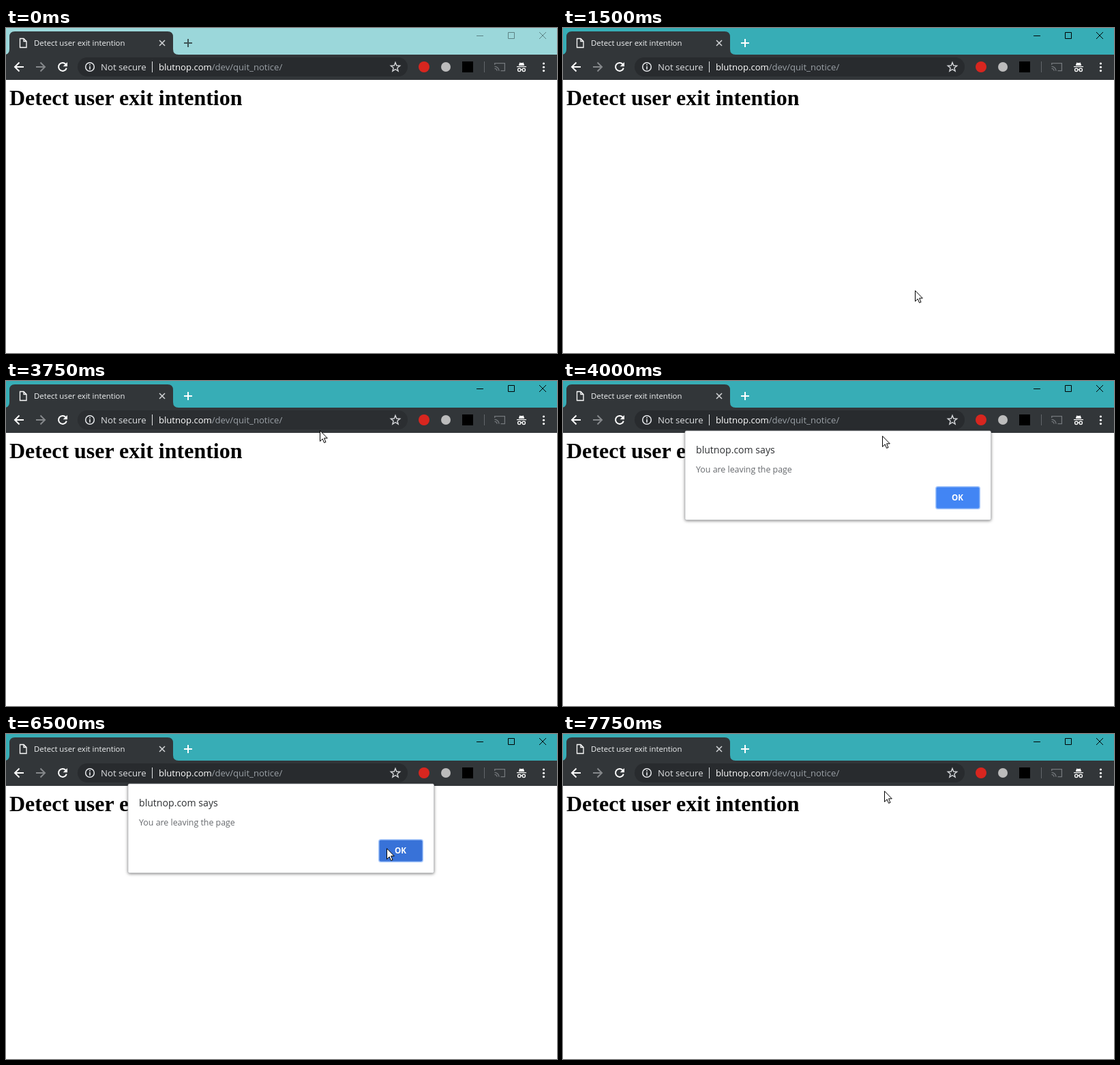
An HTML page that plays this animation: 808x476 px, repeating every 8 s.

```html
<!DOCTYPE html>
<html lang="en">
<head>
<meta charset="utf-8">
<title>Exit intention demo</title>
<style>
  html, body { margin: 0; width: 100%; height: 100%; overflow: hidden; background: #fff; }
  svg { display: block; width: 808px; height: 476px; }
  text { font-family: "Open Sans", "Noto Sans", sans-serif; white-space: pre; }
  .line { fill: none; stroke: #fff; stroke-width: 2; }
  .thin { stroke-width: 1; }
  #heading { font: bold 32px "Liberation Serif", "Times New Roman", serif; }
  #dialog rect.panel { filter: drop-shadow(0 1px 2px rgba(0, 0, 0, .5)); }
</style>
</head>
<body>
<svg viewBox="0 0 808 476">
  <rect width="808" height="476" fill="#fff"/>
  <text id="heading" x="5" y="113">Detect user exit intention</text>

  <!-- Title bar and tab -->
  <rect id="titlebar" width="808" height="39"/>
  <path fill="#323639" d="M-3 39Q5 39 5 31V13Q5 5 13 5H237Q245 5 245 13V31Q245 39 253 39Z"/>
  <path class="line" stroke-width="1" style="stroke-width:1.3" d="M20.5 15.5H26L30 19.5V28.5H20.5ZM26 15.5V19.5H30"/>
  <text x="41" y="26" font-size="11.35" fill="#f1f3f4">Detect user exit intention</text>
  <path class="line" style="stroke:#d0d2d4;stroke-width:1.6" d="M225 18L233 26M233 18L225 26"/>
  <path id="plus" class="line" d="M261 22H273M267 16V28"/>
  <path id="controls" class="line thin" d="M690 11.5H700M736.5 6.5H745.5V15.5H736.5ZM782 6L792 16M792 6L782 16"/>

  <!-- Toolbar -->
  <rect y="39" width="808" height="37" fill="#323639"/>
  <path class="line" d="M26 57H13M19.5 50.5L13 57L19.5 63.5"/>
  <path class="line" style="stroke:#85888b" d="M44 57H57M50.5 50.5L57 57L50.5 63.5"/>
  <path class="line" d="M87.6 53A6 6 0 1 0 88.8 58.6"/>
  <path fill="#fff" d="M90 50V56.3H83.7Z"/>

  <rect id="bar" x="105" y="43" width="484" height="28" rx="14"/>
  <circle class="line" style="stroke:#e8eaed;stroke-width:1.5" cx="123" cy="57" r="6.3"/>
  <path class="line" style="stroke:#e8eaed;stroke-width:1.6" d="M123 53V54.7M123 56V60.7"/>
  <text x="139" y="62" font-size="13.2" fill="#e0e2e4">Not secure</text>
  <path class="line thin" style="stroke:#e0e2e4" d="M214.5 49V65"/>
  <text x="224" y="62" font-size="13.1" fill="#fff">blutnop.com<tspan fill="#9aa0a6">/dev/quit_notice/</tspan></text>
  <path id="star" class="line" style="stroke:#d5d7da;stroke-width:1.4"/>

  <circle cx="613" cy="57" r="8" fill="#d8261f"/>
  <circle cx="645" cy="57" r="7" fill="#bcbcbc"/>
  <rect x="669" y="49" width="16" height="16" fill="#000"/>
  <path class="line thin" style="stroke:#62666a" d="M701.5 49V65"/>
  <path class="line" style="stroke:#73777b;stroke-width:1.3" d="M716.7 54V51.6H731.4V62.6H725.5M716.5 56.3A6.5 6.5 0 0 1 723 62.8M716.5 59.3A3.5 3.5 0 0 1 720 62.8"/>
  <path fill="#fff" d="M751.8 55L753.2 50.5Q756 51.6 758.8 50.5L760.2 55ZM749 56H763V57.2H749Z"/>
  <path class="line" style="stroke-width:1.3" d="M755 61Q756 60.2 757 61"/>
  <circle class="line" style="stroke-width:1.3" cx="752.7" cy="61.3" r="2.2"/>
  <circle class="line" style="stroke-width:1.3" cx="759.3" cy="61.3" r="2.2"/>
  <g fill="#fff">
    <circle cx="788.5" cy="52" r="1.6"/>
    <circle cx="788.5" cy="57.3" r="1.6"/>
    <circle cx="788.5" cy="62.6" r="1.6"/>
  </g>

  <g id="dialog">
    <rect class="panel" x="179" y="73" width="448.5" height="130.5" rx="2" fill="#fff" stroke="#b8babd" stroke-width=".7"/>
    <text x="195" y="106" font-size="14.1" fill="#2b2d30">blutnop.com says</text>
    <text x="195" y="134" font-size="12.4" fill="#66696d">You are leaving the page</text>
    <rect x="546" y="154" width="66" height="34" rx="3.5" fill="#a5c6fa"/>
    <rect id="button" x="547.5" y="155.5" width="63" height="31" rx="2"/>
    <text x="578.5" y="175" font-size="11.6" font-weight="700" text-anchor="middle" fill="#fff">OK</text>
  </g>

  <path id="cursor" fill="#fff" stroke="#000" stroke-width="1"
    d="M.5 .7V16.3L4.2 12.8L6.6 18.4L9 17.4L6.6 11.8H11.3Z"/>
</svg>

<script>
const LOOP = 8000;
const $ = id => document.getElementById(id);

// Each row: start time, value held until the next row.
const cursorSteps = [
  [0, null], [750, [516, 418]], [1500, [516, 384]], [1750, [358, 233]],
  [2000, [246, 205]], [2250, [248, 202]], [2500, [440, 192]], [2750, [469, 139]],
  [3000, [561, 31]], [3250, [565, 15]], [3750, [460, 72]], [4000, [468, 80]],
  [5000, [469, 93]], [5750, [470, 86]], [6000, [533, 147]], [6250, [558, 167]],
  [7000, [491, 215]], [7250, [454, 330]], [7500, [469, 134]], [7750, [471, 83]]
];
const barSteps = [[0, '#282b2e'], [3000, '#2b2e31'], [3250, '#282b2e'], [3750, '#2b2e31'], [4000, '#282b2e']];
const buttonSteps = [[0, '#4285f4'], [6250, '#3f80ee'], [6500, '#3872d8']];
const dialogSteps = [[0, false], [4000, true], [6750, false]];
const focusSteps = [[0, false], [500, true]];

const at = (steps, t) => steps.findLast(([start]) => t >= start)[1];
const show = (el, on) => el.setAttribute('visibility', on ? 'visible' : 'hidden');

const starPoints = Array.from({ length: 10 }, (_, i) => {
  const r = i % 2 ? 3 : 7, a = (i / 5 - .5) * Math.PI;
  return [571 + r * Math.cos(a), 57.5 + r * Math.sin(a)];
});
$('star').setAttribute('d', 'M' + starPoints.join('L') + 'Z');

function render(t) {
  const focused = at(focusSteps, t);
  $('titlebar').style.fill = focused ? '#37adb6' : '#9bd7da';
  $('plus').style.stroke = focused ? '#fff' : '#3f5557';
  $('controls').style.stroke = focused ? '#000' : '#5c8284';
  $('bar').style.fill = at(barSteps, t);
  $('button').style.fill = at(buttonSteps, t);
  show($('dialog'), at(dialogSteps, t));

  const pos = at(cursorSteps, t);
  show($('cursor'), pos);
  if (pos) $('cursor').setAttribute('transform', `translate(${pos})`);
}

const start = performance.now();
function tick() {
  render((performance.now() - start) % LOOP);
  requestAnimationFrame(tick);
}
tick();
</script>
</body>
</html>
```
